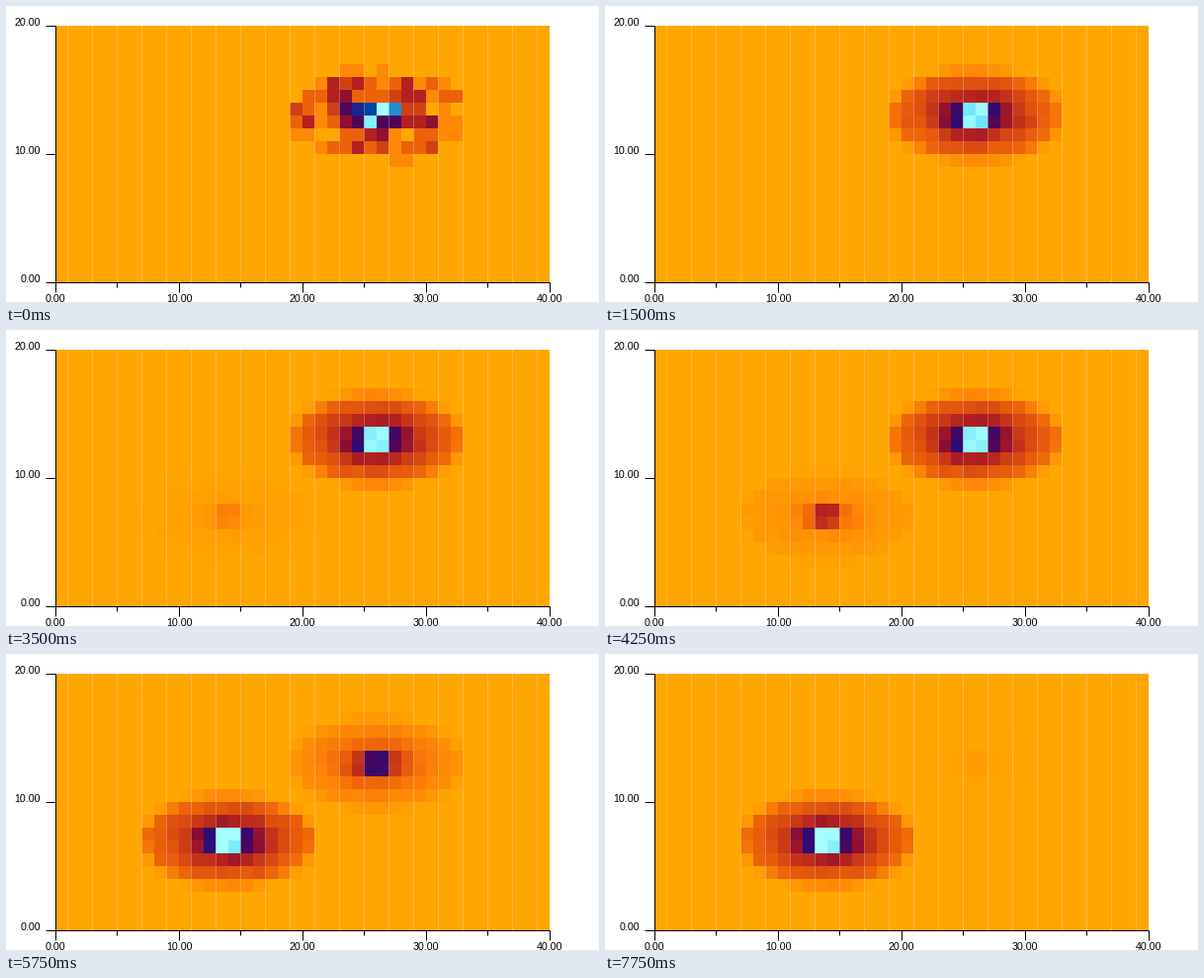
A matplotlib script that plays this animation: 600 px wide and 300 px high, repeating every 8000 ms.

```python
import numpy as np
import matplotlib.pyplot as plt
from matplotlib.animation import FuncAnimation
from matplotlib.collections import PolyCollection
from matplotlib.colors import LinearSegmentedColormap

WIDTH, HEIGHT, DPI = 600, 300, 100
COLS, ROWS = 40, 20
LEFT, BOTTOM, CELL_W, CELL_H = 50, 280, 12.5, 13
STEP_MS, STEPS = 250, 32
PEAK = 17            # particles in the hottest cell
RATE = 1.57          # how fast new particles outweigh old ones, per second
CROSSING = 5.25      # both spots are equally hot at this second
LOWER_START = 2.75

STOPS = [(0, "#ffa600"), (1, "#ff8805"), (2, "#ec6109"), (4, "#b22020"),
         (6, "#700040"), (8, "#2c0c75"), (10, "#0044a5"), (14, "#46d4f3"),
         (17, "#a5ffff")]
HEAT = LinearSegmentedColormap.from_list(
    "heat", [(level / PEAK, color) for level, color in STOPS], N=1024)


def spot(cx, cy, rx=7, ry=3.55, falloff=1.08, fine=20):
    """Mean density of particles spread evenly in angle and radius."""
    x = (np.arange(COLS * fine) + .5) / fine - cx
    y = (np.arange(ROWS * fine) + .5) / fine - cy
    r = np.hypot(x[None, :] / rx, y[:, None] / ry)
    density = np.where(r < 1, 1 / r, 0)
    cells = density.reshape(ROWS, fine, COLS, fine).mean(axis=(1, 3))
    return PEAK * (cells / cells.max()) ** falloff


rng = np.random.default_rng(7)
upper, lower = spot(26, 13), spot(14, 7)
grain = np.clip(rng.normal(size=(ROWS, COLS)), -1.5, 1.5)

# The first few particles, with a hot diagonal in the middle
first = rng.poisson(upper).astype(float)
first[12:14, 25:27] = [[16, 7], [10, 17]]


def heat(t):
    """Heat level of every cell at t seconds."""
    old = np.exp(-RATE * t)
    young = min(1, np.exp((CROSSING - t) / .35))
    top = old * first + (1 - old) * upper * (1 + .06 * grain)
    low = lower * (1 + (.05 + .07 * young) * grain)

    ratio = np.exp(RATE * (t - CROSSING))
    total = top * min(1, 1 / ratio)
    if t >= LOWER_START:
        total = total + low * min(1, ratio)
    return np.clip(total, 0, PEAK)


def cell_colors(t):
    return HEAT(heat(t).ravel() / PEAK)


def cell_corners(row, col):
    x0, y0 = LEFT + col * CELL_W, BOTTOM - row * CELL_H
    x1, y1 = x0 + CELL_W, y0 - CELL_H
    return [(x0, y0), (x1, y0), (x1, y1), (x0, y1)]


fig = plt.figure(figsize=(WIDTH / DPI, HEIGHT / DPI), dpi=DPI, facecolor="white")
ax = fig.add_axes([0, 0, 1, 1])
ax.set_xlim(0, WIDTH)
ax.set_ylim(HEIGHT, 0)
ax.axis("off")

corners = [cell_corners(r, c) for r in range(ROWS) for c in range(COLS)]
cells = PolyCollection(corners, facecolors=cell_colors(0), edgecolors="none",
                       linewidths=0, antialiaseds=True)
cells.set_snap(False)  # soft half-pixel seams between columns
ax.add_collection(cells, autolim=False)


def line(xs, ys):
    # Snapping moves whole coordinates onto pixel centres.
    ax.plot(xs, ys, color="black", lw=72 / DPI, solid_capstyle="butt",
            snap=True, zorder=3)


def label(x, y, value, align):
    ax.text(x, y, f"{value:.2f}", ha=align, va="baseline", color="black",
            family="Liberation Sans", fontsize=10.6 * 72 / DPI)


line([LEFT, LEFT], [20, BOTTOM])
line([LEFT, LEFT + COLS * CELL_W], [BOTTOM, BOTTOM])
for value in range(0, ROWS + 1, 10):
    y = BOTTOM - value * CELL_H
    line([40, LEFT], [y, y])
    label(35, y, value, "right")
for value in range(0, COLS + 1, 5):
    x = LEFT + value * CELL_W
    major = value % 10 == 0
    line([int(x)] * 2, [BOTTOM, BOTTOM + (10 if major else 5)])
    if major:
        label(x, 300, value, "center")


def update(i):
    cells.set_facecolor(cell_colors(i * STEP_MS / 1000))
    return [cells]


anim = FuncAnimation(fig, update, frames=STEPS, interval=STEP_MS, repeat=True)
plt.show()
```
